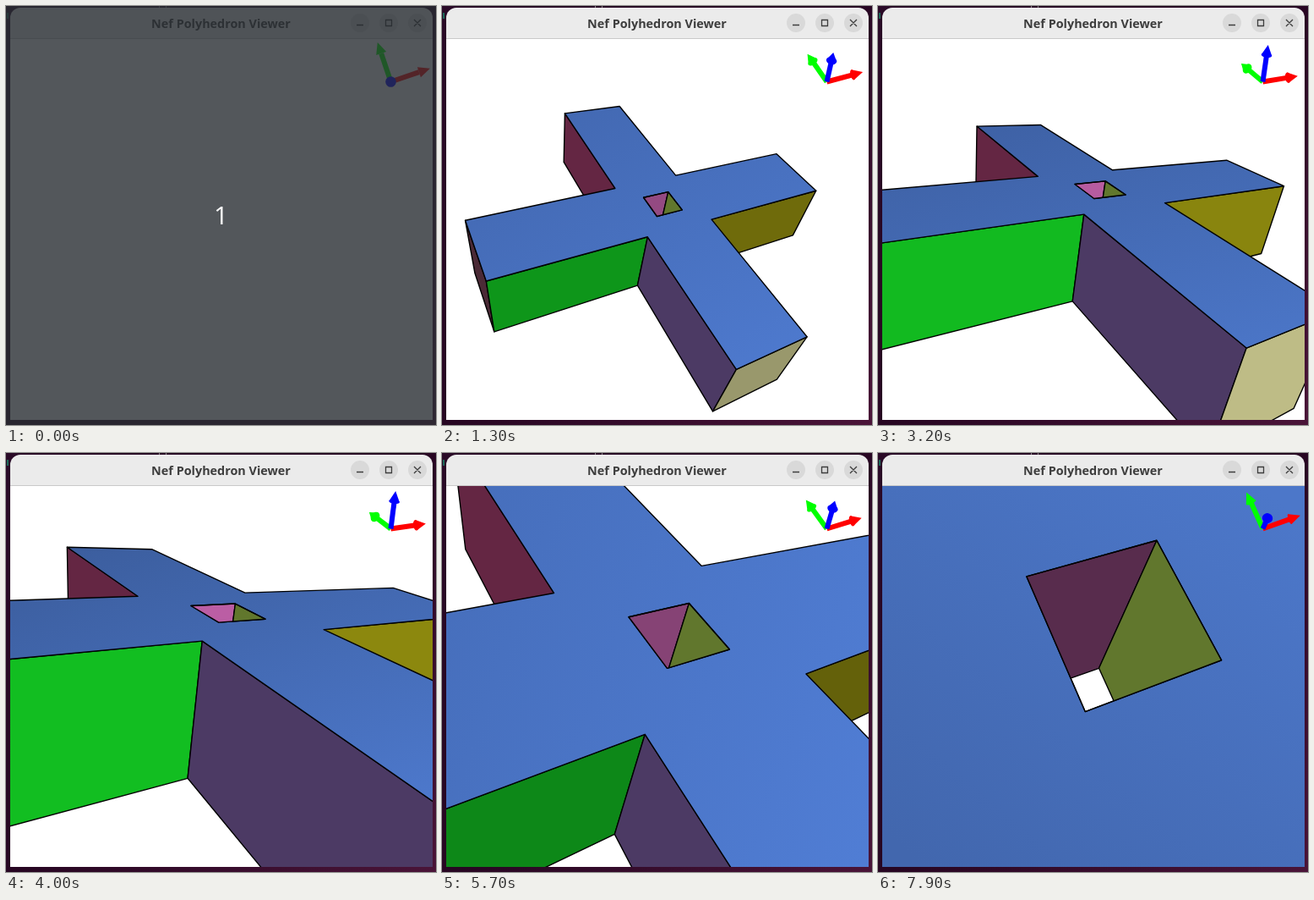
An HTML page with a canvas for the animation above (8000 ms loop, 509 by 495 pixels).

```html
<!DOCTYPE html>
<html lang="en">
<head>
<meta charset="utf-8">
<title>Nef Polyhedron Viewer</title>
<style>
  html, body { margin: 0; width: 100%; height: 100%; overflow: hidden; background: #2a0a27; }
  canvas { display: block; }
</style>
</head>
<body>
<canvas id="stage" width="509" height="495"></canvas>
<script>
const ctx = document.getElementById('stage').getContext('2d');
const LOOP = 8000, STEP = 100, APPEAR = 500;
const VIEW = { x: 5, y: 39, w: 500, h: 450 };
const CX = VIEW.x + VIEW.w / 2, CY = VIEW.y + VIEW.h / 2;
const FOCAL = VIEW.h / 2 / Math.tan(Math.PI / 8);
const ARM = 5, HOLE = 0.4;
const TAU = Math.PI * 2, rad = d => d * Math.PI / 180;

// time, distance, tilt, roll, yaw, pan x, pan y, shade from, shade to, shade angle
const KEYS = [
  [500, 14.8, 39, -15, 37.7, 0, 0, 0.82, 1, 60],
  [1300, 13.44, 46.2, -12.7, 37.2, -0.01, 0.01, 0.8, 1, 60],
  [3200, 10.34, 63.7, -8.2, 35.4, 0.015, -0.025, 0.71, 0.99, 75],
  [4000, 7.17, 66.4, -7.3, 34.7, -0.025, 0.035, 0.7, 1, 70],
  [4900, 6.09, 53.2, -11.35, 37.9, 0.063, -0.38, 0.84, 1, 60],
  [6600, 5.087, 35.4, -21.1, 46.5, 0, -0.005, 0.9, 1, -30],
  [7900, 3.37, 22.8, -23.9, 45.8, 0.007, -0.045, 0.82, 0.95, -50]
];
const REST = [0, 14, 0, 0, 18.7, 0, 0, 1, 1, 0];

function slope(i, c) {
  const d = k => (KEYS[k + 1][c] - KEYS[k][c]) / (KEYS[k + 1][0] - KEYS[k][0]);
  if (i === 0) return d(0);
  if (i === KEYS.length - 1) return d(i - 1);
  const a = d(i - 1), b = d(i);
  return a * b > 0 ? 2 * a * b / (a + b) : 0;
}

function poseAt(t) {
  if (t < APPEAR) return REST;
  let i = 0;
  while (i < KEYS.length - 2 && t >= KEYS[i + 1][0]) i++;
  const A = KEYS[i], B = KEYS[i + 1], span = B[0] - A[0];
  const u = Math.min(1, (t - A[0]) / span), v = 1 - u;
  return A.map((a, c) => v * v * (1 + 2 * u) * a + u * u * (3 - 2 * u) * B[c]
    + span * u * v * (v * slope(i, c) - u * slope(i + 1, c)));
}

function rotator([, , tilt, roll, yaw]) {
  const turn = (a, b, d) => {
    const c = Math.cos(rad(d)), s = Math.sin(rad(d));
    return [a * c - b * s, a * s + b * c];
  };
  return ([x, y, z]) => {
    [x, y] = turn(x, y, yaw);
    [y, z] = turn(y, z, -tilt);
    [x, y] = turn(x, y, roll);
    return [x, y, z];
  };
}

const rgb = (c, k = 1) => `rgb(${c.map(v => Math.round(v * k)).join()})`;

function trace(pts) {
  ctx.beginPath();
  pts.forEach(([x, y]) => ctx.lineTo(x, y));
  ctx.closePath();
}

function face(pts, fill) {
  trace(pts);
  ctx.fillStyle = fill;
  ctx.fill();
  ctx.stroke();
}

function drawSolid(pose, rotate) {
  const [, dist, , , , px, py, from, to, angle] = pose;
  const project = p => {
    const [x, y, z] = rotate(p), k = FOCAL / (dist - z);
    return [CX + (x + px) * k, CY - (y + py) * k];
  };
  const wall = (x1, y1, x2, y2, color, k) =>
    face([[x1, y1, 1], [x2, y2, 1], [x2, y2, -1], [x1, y1, -1]].map(project), rgb(color, k));
  const top = pts => pts.map(([x, y]) => project([x, y, 1]));
  const lit = Math.max(0.47, Math.min(1, 0.1 - 1.2 * rotate([0, 1, 0])[2]));

  ctx.strokeStyle = '#000';
  ctx.lineWidth = 1.4;
  ctx.lineJoin = 'round';

  wall(-1, 1, -1, ARM, [100, 38, 67]);
  wall(1, -1, ARM, -1, [140, 136, 14], lit);
  wall(-ARM, -1, -ARM, 1, [75, 42, 54]);
  wall(-ARM, -1, -1, -1, [18, 190, 33], lit);
  wall(-1, -ARM, -1, -1, [76, 58, 100]);
  wall(-1, -ARM, 1, -ARM, [194, 192, 137], lit);

  const dx = 300 * Math.cos(rad(angle)), dy = 300 * Math.sin(rad(angle));
  const blue = ctx.createLinearGradient(CX - dx, CY - dy, CX + dx, CY + dy);
  blue.addColorStop(0, rgb([80, 125, 212], from));
  blue.addColorStop(1, rgb([80, 125, 212], to));
  face(top([
    [-ARM, -1], [-1, -1], [-1, -ARM], [1, -ARM], [1, -1], [ARM, -1],
    [ARM, 1], [1, 1], [1, ARM], [-1, ARM], [-1, 1], [-ARM, 1]
  ]), blue);

  const h = HOLE, rim = top([[-h, -h], [h, -h], [h, h], [-h, h]]);
  face(rim, '#fff');
  ctx.save();
  trace(rim);
  ctx.clip();
  wall(-h, h, h, h, [187, 94, 164], lit);
  wall(h, -h, h, h, [97, 119, 45]);
  ctx.restore();
  trace(rim);
  ctx.stroke();
}

function drawAxes(rotate) {
  const ox = 455.5, oy = 89.5, len = 49;
  const axes = [[1, 0, 0], [0, 1, 0], [0, 0, 1]]
    .map((a, i) => ({ dir: rotate(a), color: ['#f00', '#0f0', '#00f'][i] }))
    .sort((a, b) => a.dir[2] - b.dir[2]);
  for (const { dir: [x, y, z], color } of axes) {
    const run = Math.hypot(x, y) * len, neck = run * 0.72, r = 6.3;
    ctx.save();
    ctx.translate(ox, oy);
    ctx.rotate(Math.atan2(-y, x));
    ctx.strokeStyle = ctx.fillStyle = color;
    ctx.lineWidth = 6;
    ctx.beginPath();
    ctx.moveTo(0, 0);
    ctx.lineTo(neck, 0);
    ctx.stroke();
    ctx.beginPath();
    ctx.ellipse(neck, 0, r * Math.abs(z), r, 0, 0, TAU);
    ctx.fill();
    trace([[neck, -r], [run, 0], [neck, r]]);
    ctx.fill();
    ctx.restore();
  }
}

function drawDesktop() {
  const bg = ctx.createLinearGradient(0, 0, 509, 495);
  bg.addColorStop(0, '#2a0a27');
  bg.addColorStop(0.5, '#270622');
  bg.addColorStop(1, '#4a1438');
  ctx.fillStyle = bg;
  ctx.fillRect(0, 0, 509, 495);
  ctx.fillStyle = '#1c6b5a';
  ctx.fillRect(1, 8, 2, 7);
  ctx.fillStyle = '#8d838b';
  ctx.fillRect(181, 0, 1, 2);
  ctx.fillRect(189, 0, 1, 2);
}

function drawTitleBar() {
  ctx.fillStyle = '#ebebeb';
  ctx.beginPath();
  ctx.roundRect(5, 2, 500, 37, [12, 12, 0, 0]);
  ctx.fill();
  ctx.fillStyle = '#c9c9c9';
  ctx.fillRect(5, 38, 500, 1);

  ctx.fillStyle = '#3d3d3d';
  ctx.font = 'bold 14.4px "Open Sans", "Noto Sans", sans-serif';
  ctx.textAlign = 'center';
  ctx.fillText('Nef Polyhedron Viewer', 254.5, 26);

  ctx.fillStyle = '#d9d9d9';
  for (const x of [419, 453, 487]) {
    ctx.beginPath();
    ctx.arc(x, 20, 11, 0, TAU);
    ctx.fill();
  }
  ctx.strokeStyle = '#3d3d3d';
  ctx.lineWidth = 1.3;
  ctx.lineJoin = 'miter';
  ctx.beginPath();
  ctx.moveTo(415, 22.5);
  ctx.lineTo(423, 22.5);
  ctx.rect(449.5, 16.5, 7, 7);
  ctx.moveTo(483, 16);
  ctx.lineTo(491, 24);
  ctx.moveTo(491, 16);
  ctx.lineTo(483, 24);
  ctx.stroke();
}

function drawCountdown() {
  ctx.fillStyle = 'rgba(40, 45, 51, 0.8)';
  ctx.fillRect(0, 0, 509, 495);
  ctx.fillStyle = '#fff';
  ctx.font = '30px "Open Sans", "Noto Sans", sans-serif';
  ctx.textAlign = 'center';
  ctx.fillText('1', 254.5, 258);
}

function draw(t) {
  const pose = poseAt(t), rotate = rotator(pose);
  drawDesktop();
  drawTitleBar();
  ctx.save();
  ctx.beginPath();
  ctx.rect(VIEW.x, VIEW.y, VIEW.w, VIEW.h);
  ctx.clip();
  ctx.fillStyle = '#fff';
  ctx.fillRect(VIEW.x, VIEW.y, VIEW.w, VIEW.h);
  if (t >= APPEAR) drawSolid(pose, rotate);
  drawAxes(rotate);
  ctx.restore();
  if (t < STEP) drawCountdown();
}

const start = performance.now();
function tick() {
  const t = (performance.now() - start) % LOOP;
  draw(Math.floor(t / STEP) * STEP);
  requestAnimationFrame(tick);
}
tick();
</script>
</body>
</html>
```
